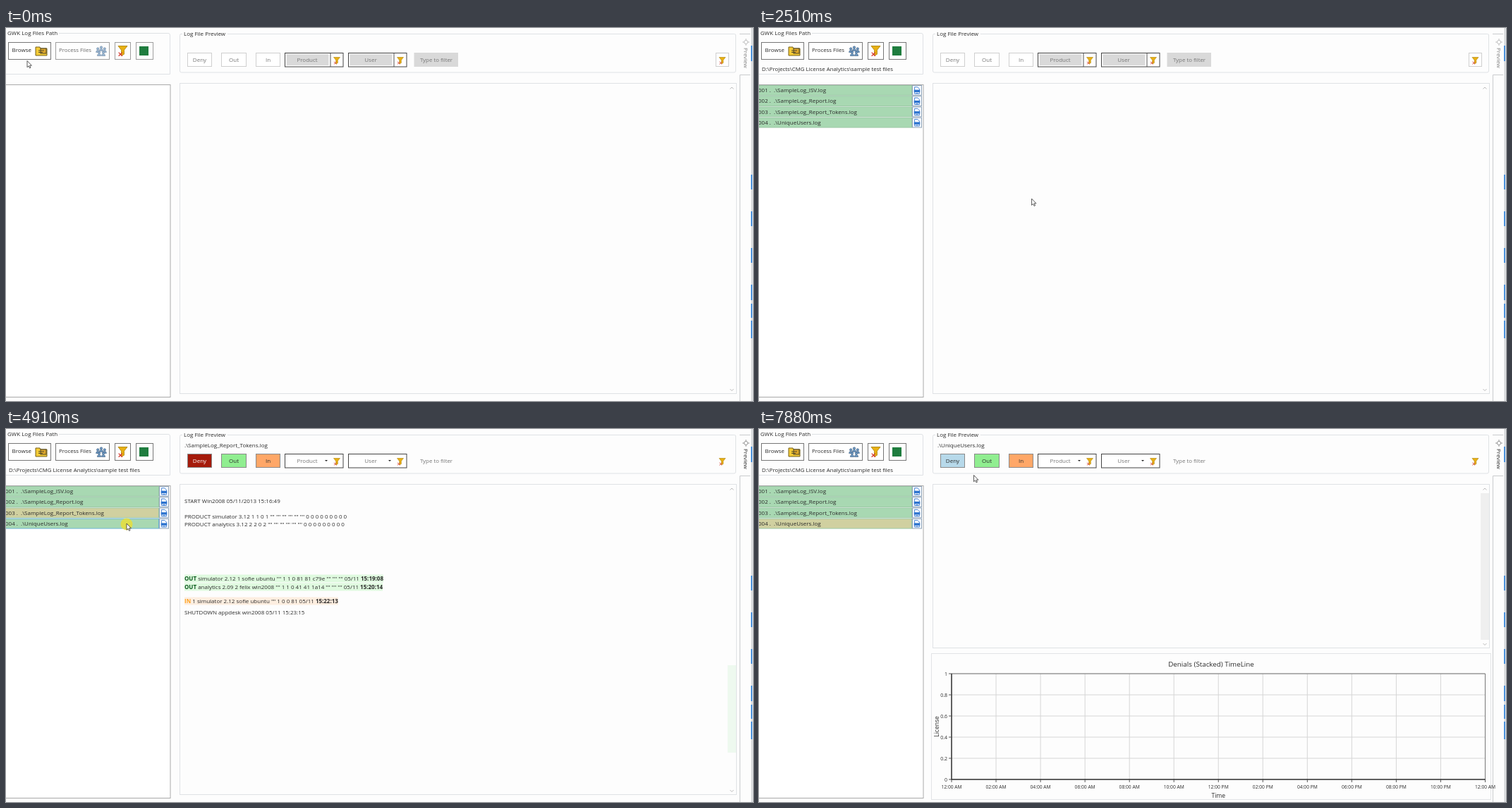
Animation, 1059 px wide and 529 px high, one loop 8000 ms. Source, as an HTML page:

```html
<!DOCTYPE html>
<html lang="en">
<head>
<meta charset="utf-8">
<title>Log file preview</title>
<style>
html, body { margin: 0; width: 100%; height: 100%; overflow: hidden; background: #fdfdfd; }
svg { display: block; width: 1059px; height: 529px; }
text { font: 8px "Open Sans", "Noto Sans", sans-serif; fill: #2b2b2b; white-space: pre; }
.b, .b text { font-weight: 700; }
.m { text-anchor: middle; }
.e { text-anchor: end; }
.dim { fill: #777; }
.head { fill: #4c607a; }
.line { fill: none; stroke: #dfe2e5; }
.pen { fill: none; stroke: #555; }
</style>
</head>
<body>
<svg id="stage" viewBox="0 0 1059 529"></svg>
<script>
const stage = document.getElementById('stage');
const $ = id => document.getElementById(id);
const esc = s => s.replace(/&/g, '&amp;').replace(/</g, '&lt;');
const text = (x, y, s, a = '') => `<text x="${x}" y="${y}" ${a}>${esc(s)}</text>`;
const rect = (x, y, w, h, a = '') => `<rect x="${x}" y="${y}" width="${w}" height="${h}" ${a}/>`;
const path = (d, a = 'class="pen"') => `<path d="${d}" ${a}/>`;
const at = (x, y, s, k = 1) => `<g transform="translate(${x} ${y}) scale(${k})">${s}</g>`;
const group = (id, s, a = '') => `<g id="${id}" ${a}>${s}</g>`;
const fill = c => `fill="${c}"`;
const box = (f, s) => `fill="${f}" stroke="${s}"`;

const files = ['SampleLog_ISV.log', 'SampleLog_Report.log', 'SampleLog_Report_Tokens.log', 'UniqueUsers.log'];

// Each line: baseline, then text; ~ stands for an empty quoted field.
const docs = [`105 START Win2008 05/10/2013 09:02:11
127 PRODUCT simulator 2.12 1 1 0 1 ~ ~ ~ ~ ~ ~ 0 0 0 0 0 0 0 0 0
138 PRODUCT analytics 2.09 2 2 0 2 ~ ~ ~ ~ ~ ~ 0 0 0 0 0 0 0 0 0
161 OUT analytics 2.09 2 felix win2008 ~ 1 1 0 41 41 1a14 ~ ~ ~ 05/10 09:04:20
173 OUT simulator 2.12 1 sofie ubuntu ~ 1 1 0 81 81 c79e ~ ~ ~ 05/10 09:11:32
185 IN 1 simulator 2.12 sofie ubuntu ~ 1 0 0 81 05/10 09:45:08
197 IN 2 analytics 2.09 felix win2008 ~ 1 0 0 41 05/10 10:12:51
209 SHUTDOWN appdesk win2008 05/10 10:30:15
309 START Win2008 05/10/2013 11:24:28
342 PRODUCT datavis 2.12 1 10 0 10 ~ ~ ~ ~ ~ ~ 0 0 0 0 0 0 0 0 0
365 OUT datavis 2.04 1 felix win2008 ~ 1 1 0 41 41 3ec ~ ~ ~ 05/10 11:25:00
377 IN 1 datavis 2.04 felix win2008 ~ 1 0 0 41 05/10 12:03:42`,
`172 START Win2008 05/11/2013 15:16:49
205 PRODUCT simulator 3.12 1 1 0 1 ~ ~ ~ ~ ~ ~ 0 0 0 0 0 0 0 0 0
216 PRODUCT analytics 3.12 2 2 0 2 ~ ~ ~ ~ ~ ~ 0 0 0 0 0 0 0 0 0
239 OUT analytics 2.09 2 felix win2008 ~ 1 1 0 41 41 1a14 ~ ~ ~ 05/11 15:17:14
251 OUT simulator 2.12 1 sofie ubuntu ~ 1 1 0 81 81 c79e ~ ~ ~ 05/11 15:19:08
263 DENY simulator 2.1 felix win2008 ~ 1 -22 1 05/11 15:20
275 IN 1 simulator 2.12 sofie ubuntu ~ 1 0 0 81 05/11 15:22:13
286 INUSE analytics 3.12 2 felix win2008 ~ 1 41 1a14 05/11 15:23:15
297 SHUTDOWN appdesk win2008 05/11 15:23:15
397 START Win2008 05/11/2013 15:24:28
430 PRODUCT datavis 3.12 1 10 0 10 ~ ~ ~ ~ ~ ~ 0 0 0 0 0 0 0 0 0
441 PRODUCT analytics 3.12 2 3 0 3 ~ ~ ~ ~ ~ ~ 0 0 0 0 0 0 0 0 0
452 PRODUCT simulator 3.12 3 50 0 50 ~ ~ ~ ~ ~ ~ 0 0 0 0 0 0 0 0 0
475 OUT datavis 2.04 1 felix win2008 ~ 1 1 0 41 41 3ec ~ ~ ~ 05/11 15:25:00
487 OUT analytics 3.03 2 sofie ubuntu ~ 1 1 0 81 81 c7c8 ~ ~ ~ 05/11 15:26:36
499 OUT datavis 3.01 1 felix redhat ~ 1 2 0 c1 c1 c823 ~ ~ ~ 05/11 15:28:06
522 IN 1 analytics 3.03 sofie ubuntu ~ 1 0 0 81 05/11 16:07:30`,
`105 START Win2008 05/11/2013 15:16:49
127 PRODUCT simulator 3.12 1 1 0 1 ~ ~ ~ ~ ~ ~ 0 0 0 0 0 0 0 0 0
138 PRODUCT analytics 3.12 2 2 0 2 ~ ~ ~ ~ ~ ~ 0 0 0 0 0 0 0 0 0
215 OUT simulator 2.12 1 sofie ubuntu ~ 1 1 0 81 81 c79e ~ ~ ~ 05/11 15:19:08
227 OUT analytics 2.09 2 felix win2008 ~ 1 1 0 41 41 1a14 ~ ~ ~ 05/11 15:20:14
247 IN 1 simulator 2.12 sofie ubuntu ~ 1 0 0 81 05/11 15:22:13
263 SHUTDOWN appdesk win2008 05/11 15:23:15`,
`105 START SERVER 09/12/2012 11:03:01
116 PRODUCT simulator 1.9 1 10 0 10 "ANY" ~ ~ ~ ~ ~ 0 0 0 0
129 IN 2 simulator 1.1 toby linuxbox ~ 1 9 0 286 09/12 15:52:41
140.5 OUT simulator 1.1 1 alec alec-laptop ~ 1 10 0 287 287 88c ~ ~ ~ 09/12 21:27:33
152.5 OUT simulator 1.1 1 diana osxlion ~ 1 11 0 d9 d9 10a0 ~ ~ ~ 09/13 15:46:50
164.5 IN 2 simulator 1.1 diana osxlion ~ 1 10 0 d9 09/13 15:52:41
176.5 IN 2 simulator 1.1 alec alec-laptop ~ 1 9 0 287 09/13 22:13:09
188.5 IN 1 simulator 1.1 estella fedora ~ 1 8 0 2c2 09/15 22:51:19`,
`95.5 DENY simulator 2.1 felix win2008 ~ 1 -22 1 05/11 15:20`];

const marks = { OUT: ['#0b5a1e', '#dffadf'], DENY: ['#8b1515', '#f8d3d1'], IN: ['#ffa21f', '#fdeee0'] };

function logLine(line) {
  const [y, ...words] = line.replace(/~/g, '""').split(' ');
  const mark = marks[words[0]];
  if (!mark) return text(253, y, words.join(' '));
  const first = words.shift(), last = words.pop();
  return rect(253, y - 8.5, 0, 11, fill(mark[1])) +
    `<text x="253" y="${y}"><tspan class="b" fill="${mark[0]}">${first}</tspan> ${words.join(' ')} <tspan class="b">${last}</tspan></text>`;
}

const funnel = path('M-5 -5H5L1.5 -.5V4L-1.5 5.5V-.5Z', 'fill="#e8b013" stroke="#a87c00" stroke-width=".6"') +
  path('M-4.5 2l4 4m0 -4l-4 4', 'stroke="#d43a2f" stroke-width="1"');
const folder = path('M-4 -4h3l1 1.5h4v7h-8z', fill('#f6c744'));
const page = rect(-3.5, -4.5, 7, 9, box('#fff', '#8b8b8b')) + path('M-2 -2h4M-2 0h4M-2 2h4', 'stroke="#aaa" stroke-width=".7"');
const logIcon = path('M-4 -5.5h5l3 3v8h-8z', box('#fff', '#2c73cf')) + rect(-5, -1, 10, 4, fill('#2c73cf')) + path('M-2 4.5h4', 'stroke="#2c73cf"');
const browseIcon = path('M-8 -5h6l1 2h9v10h-16z', box('#f5cc38', '#75601b')) + rect(-1, -3, 8, 7, box('#dfa92c', '#4d4527')) +
  path('M-4 0h8M-4 2.5h6', 'stroke="#51482a"');
const person = '<circle r="1.7" cy="-2"/><path d="M-2.6 3q0 -3 2.6 -3t2.6 3z"/>';
const peopleIcon = `<g fill="#6f9cc6" stroke="#38577a" stroke-width=".6">${at(0, -3, person)}${at(-4.8, -1, person)}${at(4.8, -1, person)}${at(-3, 4, person)}${at(3, 4, person)}</g>`;
const down = 'M-2.5 -1.2L0 1.2L2.5 -1.2', right = 'M-1.2 -2.5L1.2 0L-1.2 2.5';

function mainWindow() {
  let s = rect(0, 0, 1059, 529, fill('#fdfdfd'));
  s += path('M75 7.5H230q2.5 0 2.5 2.5V65.5H-2M250 8.5H248q-1.5 0 -1.5 2V61q0 2 2 2H1032q2.5 0 2.5 -2V10q0 -1.5 -2 -1.5H314', 'class="line"');
  s += text(2, 10, 'GWK Log Files Path') + text(252, 11, 'Log File Preview');
  s += rect(3.5, 20.5, 60, 24, box('#fff', '#777')) + text(8.5, 34, 'Browse') + at(50, 32, browseIcon);
  s += group('process', rect(70.5, 20.5, 76, 24, box('#fff', '#777')) + text(75, 34, 'Process Files', 'style="font-size:7.8px"') + at(135, 32.5, peopleIcon) +
    rect(154.5, 20.5, 22, 24, box('#fff', '#777')) + rect(184.5, 20.5, 24, 24, box('#fff', '#777')));
  s += at(165.5, 32, funnel, 1.3) + rect(189, 26, 13, 13, fill('#1f7d3f'));
  s += rect(-2.5, 80.5, 235.5, 443, box('#fff', '#a9a9a9'));
  s += group('files', text(4, 60.5, 'D:\\Projects\\CMG License Analytics\\sample test files', 'style="font-size:7.85px"') +
    files.map((f, i) => {
      const y = 81.5 + i * 15.25;
      return rect(-2, y, 218.5, 13.8, `class="row"`) + rect(217.5, y, 13, 13.8, box('#f5f9ff', '#90a4b8')) + at(224, y + 7, logIcon, .85) +
        text(-1, y + 9.5, `00${i + 1} .`, fill('#8b2020')) + text(21, y + 9.5, '.\\' + f);
    }).join(''));
  s += path('M1057.5 0V529', 'stroke="#d0d3d6" stroke-width="2"');
  [[25, 22], [208, 21], [260, 21], [312, 21], [364, 22], [391, 20], [415, 25]].forEach(([y, h]) => s += rect(1056, y, 2, h, fill('#4a90dc')));
  s += path('M1040 8.5H1055M1055 66.5H1040.5V529', 'fill="none" stroke="#c9cbcd"');
  s += group('tab', '<circle cx="1049" cy="20" r="2.6" fill="none" stroke="#999"/>' + path('M1049 15v2M1049 23v2M1044 20h2M1052 20h2', 'stroke="#999"') +
    text(0, 0, 'Preview', 'transform="translate(1046 28) rotate(90)"'));
  return s;
}

function filterBar() {
  const names = [['Deny', 257, 34], ['Out', 305, 35], ['In', 354, 34]];
  const combos = [['Product', 395, 427], ['User', 485, 517]];
  let off = '', on = text(253, 26, '', 'id="current"');
  const colors = ['#a51b0b', '#90ee90', '#ffa767'];
  names.forEach(([n, x, w], i) => {
    off += rect(x + .5, 35.5, w, 19, box('#fff', '#cfcfcf')) + text(x + .5 + w / 2, 48, n, 'class="m dim"');
    on += rect(x + .5, 35.5, w, 19, `${box(colors[i], '#8a8a8a')} id="btn${n}"`) + text(x + .5 + w / 2, 48, n, `class="m" id="lab${n}"`);
  });
  combos.forEach(([n, x, m]) => {
    const frame = rect(x + .5, 35.5, 82.5, 19.5, box('#fff', '#444'));
    off += frame + rect(x + 2.5, 37, 60, 16, fill('#d9d9d9')) + path(`M${x + 65} 36V55`) + text(m, 48, n, 'class="m dim"');
    on += frame + text(m, 48, n, 'class="m dim"') + path(`M${x + 57} 44h4l-2 2z`, fill('#222'));
  });
  off += rect(578.5, 35, 62.5, 20, fill('#d9d9d9')) + rect(1006.5, 35.5, 18, 19, box('#fff', '#cfcfcf'));
  const label = text(610, 48, 'Type to filter', 'class="m dim" style="font-size:7.9px"');
  return group('off', off) + group('on', on) + label + [469, 559, 1015.5].map(x => at(x, 46, funnel, .9)).join('');
}

function preview() {
  const arrows = y => path('M1026.5 86.5l2.5 -2.5l2.5 2.5' + `M1026.5 ${y}l2.5 2.5l2.5 -2.5`, 'fill="none" stroke="#bbb"');
  return `<clipPath id="view">${rect(247, 79, 776, 439)}</clipPath>` +
    rect(246.5, 78.5, 789, 440, 'class="line" id="panel"') +
    rect(1023, 335, 12, 124, 'fill="#eef9ef" id="tint"') +
    rect(1023, 91, 12, 244, 'fill="#cbcbcb" id="thumb"') +
    rect(1023, 91, 12, 208, 'fill="#efefef" id="track"') +
    group('tall', arrows(512)) + group('short', arrows(304)) +
    docs.map((d, i) => group('doc' + i, d.split('\n').map(logLine).join(''), 'clip-path="url(#view)"')).join('');
}

function chart(id, x1, legend) {
  const x0 = 273, w = x1 - x0;
  let s = rect(244.5, 318.5, 793, 207, box('#fdfdfd', '#e2e4e6'));
  s += text(641, 337, 'Denials (Stacked) TimeLine', 'class="m" style="font-size:9.8px"');
  for (let i = 0; i <= 5; i++) {
    const y = 497 - i * 30;
    s += path(`M${x0} ${y}H${x1}`, 'stroke="#d6d6d6"') + path(`M269 ${y}h4`) + text(267, y + 2.5, String(i / 5), 'class="e" style="font-size:7px"');
  }
  for (let i = 0; i <= 12; i++) {
    const x = x0 + w * i / 12, hour = String(i * 2 % 12 || 12).padStart(2, '0');
    s += path(`M${x} 347V497`, 'stroke="#d6d6d6"') + path(`M${x} 497v4`) +
      text(x, 510, `${hour}:00 ${i > 5 && i < 12 ? 'PM' : 'AM'}`, 'class="m" style="font-size:6.7px"');
  }
  s += path(`M${x0} 347H${x1}V497`, 'fill="none" stroke="#777"') + path(`M${x0} 347V497H${x1}`, 'fill="none" stroke="#333" stroke-width="1.5"');
  s += text(0, 0, 'License', 'class="m" style="font-size:8.5px" transform="translate(255 422) rotate(-90)"');
  s += text(x0 + w / 2, 523, 'Time', 'class="m" style="font-size:8.6px"');
  if (legend) s += rect(963, 418, 7.5, 7.5, fill('#1f9bde')) + text(973, 425, legend);
  return group(id, s);
}

function dialog() {
  let s = rect(-2, -2, 655, 365, `${box('#fff', '#8d8d8d')} style="filter:drop-shadow(1px 3px 4px #0003)"`);
  s += text(2, 7.5, 'Open') + rect(0, 43, 652, 21, fill('#f5f6f7')) + rect(0, 307, 652, 55, fill('#f0f0f0'));
  s += path('M15 28H7m3 -3l-3 3l3 3M28 28h8m-3 -3l3 3l-3 3M46 27l2.5 2.5l2.5 -2.5', 'fill="none" stroke="#ccc"') + path('M63 32.5V24.5m-3 3l3 -3l3 3');
  s += path('M71.5 17.5H498.5V38.5H71.5ZM474.5 17.5V38.5M505.5 17.5H645.5V38.5H505.5Z', 'fill="none" stroke="#d9d9d9"') + at(79, 28, folder);
  [['This PC', 98], ['Local Disk (D:)', 139], ['Projects', 207], ['CMG License Analytics', 250], ['sample test files', 347]].forEach(([n, x]) =>
    s += at(x - 7, 28, path(right)) + text(x, 31, n, 'style="font-size:7.85px"'));
  s += at(464, 28, path(down)) + path('M490 26a3.5 3.5 0 1 0 .5 3M490.5 24v2.5h-2.5');
  s += '<circle cx="521" cy="27" r="2.7" class="pen"/>' + path('M519 29l-3 3') + text(534, 31, 'Search sample test files', 'class="dim"');
  s += text(9, 56.5, 'Organize', fill('#1e395b')) + path('M46 52h4l-2 2zM586 52h4l-2 2z', fill('#333')) + text(71, 56.5, 'New folder', fill('#1e395b'));
  s += path('M568 50.5h2m2 0h7M568 53.5h2m2 0h7M568 56.5h2m2 0h7', 'stroke="#777"') + rect(606.5, 49.5, 9, 7, box('#fff', '#777')) + rect(611, 50, 4, 6, fill('#3a91d8'));
  s += '<circle cx="636" cy="53.5" r="5.5" fill="#0d5fc0"/>' + text(636, 56.5, '?', 'class="m b" style="fill:#fff"');

  s += rect(0, 286, 94, 16.5, fill('#d9d9d9'));
  const disk = rect(-4, 0, 9, 3, fill('#777'));
  const nav = [['5gold2green', 73, folder], ['Blackoil Reservo', 89.5, folder], ['sample test files', 106, folder], ['Tour', 123, folder],
    ['This PC', 145, rect(-4, -3, 9, 6, fill('#3e8fc7')) + path('M-2 4.5h5')],
    ['3D Objects', 161.5, path('M0 -4.5L4.5 -2V3L0 5L-4.5 3V-2Z', fill('#29a3c4'))],
    ['Desktop', 178, rect(-5, -3.5, 10, 7, fill('#1683d8'))], ['Documents', 195, page],
    ['Downloads', 211.5, path('M-1.5 -4h3V0h3L0 4.5L-4.5 0h3z', fill('#2576d2'))],
    ['Music', 228, path('M0 3V-4.5q1 2 3 2', 'fill="none" stroke="#1683d8" stroke-width="1.3"') + '<circle cx="-1.5" cy="3" r="2" fill="#1683d8"/>'],
    ['Pictures', 245, rect(-5, -3.5, 10, 7, box('#bfe1f5', '#7d8b95')) + path('M-4 3l3 -4l2 2l2 -1l2 3z', fill('#4a93b5'))],
    ['Videos', 261.5, rect(-5, -4, 10, 8, fill('#444')) + rect(-3, -3, 6, 6, fill('#7fb2d8'))],
    ['Local Disk (C:)', 278, disk + rect(-4, -4, 4, 3, fill('#2f91db'))], ['Local Disk (D:)', 295, disk]];
  nav.forEach(([n, y, icon], i) => {
    const root = i === 4;
    s += at(root ? 20 : 25, y, icon, .9) + text(root ? 28 : 33.5, y + 3, n, 'style="font-size:7.8px"');
    if (i > 3) s += at(root ? 8 : 12, y, path(root ? down : right, 'fill="none" stroke="#ddd"'));
  });
  s += rect(94.5, 64, 10.5, 243, fill('#f1f1f1')) + rect(95, 135, 9.5, 79, fill('#cdcdcd')) + at(99.5, 301, path(down)) + path('M97 71l2.5 -2.5l2.5 2.5');
  s += path('M109.5 64V307M297.5 66V82M396.5 66V82M479.5 66V82M533.5 66V82', 'stroke="#e4e4e4"') + path('M204 67.5l2.5 -2l2.5 2');
  [['Name', 120], ['Date modified', 301], ['Type', 400.5], ['Size', 483.5]].forEach(([n, x]) => s += text(x, 76.5, n, 'class="head"'));
  s += rect(119, 87, 413.5, 60, 'fill="#d2d2d2" id="chosen"');
  files.forEach((f, i) => {
    const y = 97.5 + i * 15;
    s += at(126.5, y - 3, page) + text(135, y, f) + text(301, y, '2/22/2020 12:33 AM', 'class="dim" style="font-size:7.8px"') +
      text(400.5, y, 'Text Document', 'class="dim"') + text(530, y, [2, 3, 1, 1][i] + ' KB', 'class="e dim"');
  });
  s += text(117, 327, 'File name:', 'class="e"') + rect(120.5, 316.5, 520, 15, box('#fff', '#8a8a8a')) + at(635, 324, path(down));
  s += group('names', rect(122, 318.5, 361, 11, fill('#0a78d6')) + text(123, 327, files.map(f => `"${f}"`).join(' '), 'style="fill:#fff"'));
  s += rect(511.5, 337.5, 60, 16, `${box('#e1e1e1', '#2f83cc')} id="open"`) + text(541.5, 348.5, 'Open', 'class="m"');
  s += rect(581.5, 337.5, 59, 16, box('#e1e1e1', '#b5b5b5')) + text(611, 348.5, 'Cancel', 'class="m"');
  s += path('M645 361l6 -6M648 361l3 -3', 'stroke="#aaa"');
  return group('dialog', s);
}

stage.innerHTML = mainWindow() + filterBar() + preview() + chart('narrow', 958.5, 'felix - win2008') + chart('wide', 1029.5) + dialog() +
  '<circle id="halo" r="8.5" fill="#f0e02a" opacity=".75"/>' +
  group('cursor', path('M0 0V9.2L2.1 7.3L3.5 10.4L5 9.7L3.6 6.7H6.4Z', 'fill="#fff" stroke="#333" stroke-width=".8"'));

stage.querySelectorAll('[id^=doc] rect').forEach(r => r.setAttribute('width', r.nextSibling.getComputedTextLength()));

// Bursts of change: first, last, count.
const bursts = [[120, 910, 8], [1150, 1950, 8], [2090, 2840, 8], [2950, 3300, 4], [3440, 3760, 4],
  [4000, 4780, 8], [4910, 5700, 8], [5830, 6630, 8], [6740, 7420, 7], [7550, 7880, 4]];
const ticks = [0, ...bursts.flatMap(([a, b, n]) => Array.from({ length: n }, (_, i) => a + (b - a) * i / (n - 1)))];
const snap = t => ticks.filter(v => v <= t + 6).pop();

const moves = [[0, 30, 46.5], [120, 30, 46.5], [345, 34, 38], [570, 34, 38], [910, 180, 120], [1150, 200, 130], [1380, 400, 220],
  [1720, 525, 345], [1950, 525, 345], [2600, 330, 200], [3300, 166, 95.5], [3440, 166, 90], [4000, 166, 90], [4111, 168, 103],
  [4222, 169, 106], [4334, 169, 117], [4446, 169, 117], [4910, 171, 134], [5020, 172, 134], [5600, 180, 128], [5944, 188.5, 92],
  [6285, 272, 44], [6401, 272, 44], [6740, 250, 60], [6967, 186, 102], [7080, 186, 102], [7193, 184.5, 118.5], [7307, 185, 119],
  [7420, 186, 134], [7550, 186, 134], [7880, 304.5, 65.5]];
const clicks = [345, 3440, 4111, 4334, 4910, 6285, 6967, 7307, 7420];
const picks = [[3550, 0], [4105, 1], [4440, 2], [5020, 3], [7075, 1], [7300, 2], [7545, 3]];

function pointer(t) {
  const i = moves.findIndex(m => m[0] > t);
  if (i < 0) return moves[moves.length - 1].slice(1);
  const [a, x, y] = moves[i - 1], [b, u, v] = moves[i], k = (t - a) / (b - a);
  return [x + (u - x) * k, y + (v - y) * k];
}
const show = (id, on) => $(id).style.display = on ? '' : 'none';
const set = (id, name, v) => $(id).setAttribute(name, v);
const rows = [...document.querySelectorAll('.row')];

function draw(time) {
  const t = snap(time), [x, y] = pointer(t);
  const loaded = t > 1940, deny = t > 6395;
  const pick = picks.filter(p => p[0] <= t).pop()?.[1] ?? -1, active = pick >= 0;
  const modal = t > 560 && t < 1830;

  show('dialog', modal);
  show('chosen', t > 1370);
  show('names', t > 1370);
  set('open', 'fill', t > 1700 ? '#cce4f7' : '#e1e1e1');

  show('files', loaded);
  set('process', 'opacity', loaded ? 1 : .7);
  const hover = active && x < 217 ? Math.floor((y - 81) / 15.25) : -1;
  rows.forEach((r, i) => {
    r.setAttribute('fill', i === pick ? '#d0d0a0' : '#a8d8b2');
    r.setAttribute('stroke', i === hover ? '#6db3d6' : '#9bc7a6');
  });

  show('off', !active);
  show('on', active);
  set('tab', 'opacity', active ? 1 : .6);
  $('current').textContent = active ? '.\\' + files[pick] : '';
  set('btnDeny', 'fill', deny ? '#b7d9ea' : '#a51b0b');
  $('labDeny').style.fill = deny ? '#2b2b2b' : '#fff';

  const doc = deny ? (pick === 1 ? 4 : -1) : pick;
  docs.forEach((_, i) => show('doc' + i, i === doc));
  set('panel', 'height', deny ? 232 : 440);
  show('tall', !deny);
  show('short', deny);
  show('track', deny);
  show('thumb', !deny && (pick === 0 || pick === 1));
  set('thumb', 'height', pick === 0 ? 368 : 244);
  show('tint', !deny && pick > 0);
  show('narrow', deny && pick === 1);
  show('wide', deny && pick !== 1);

  show('halo', clicks.some(c => Math.abs(c - t) < 30));
  set('halo', 'cx', x);
  set('halo', 'cy', y + 1);
  set('cursor', 'transform', `translate(${x} ${y})`);
}

const start = performance.now();
function loop() {
  draw((performance.now() - start) % 8000);
  requestAnimationFrame(loop);
}
loop();
</script>
</body>
</html>
```
